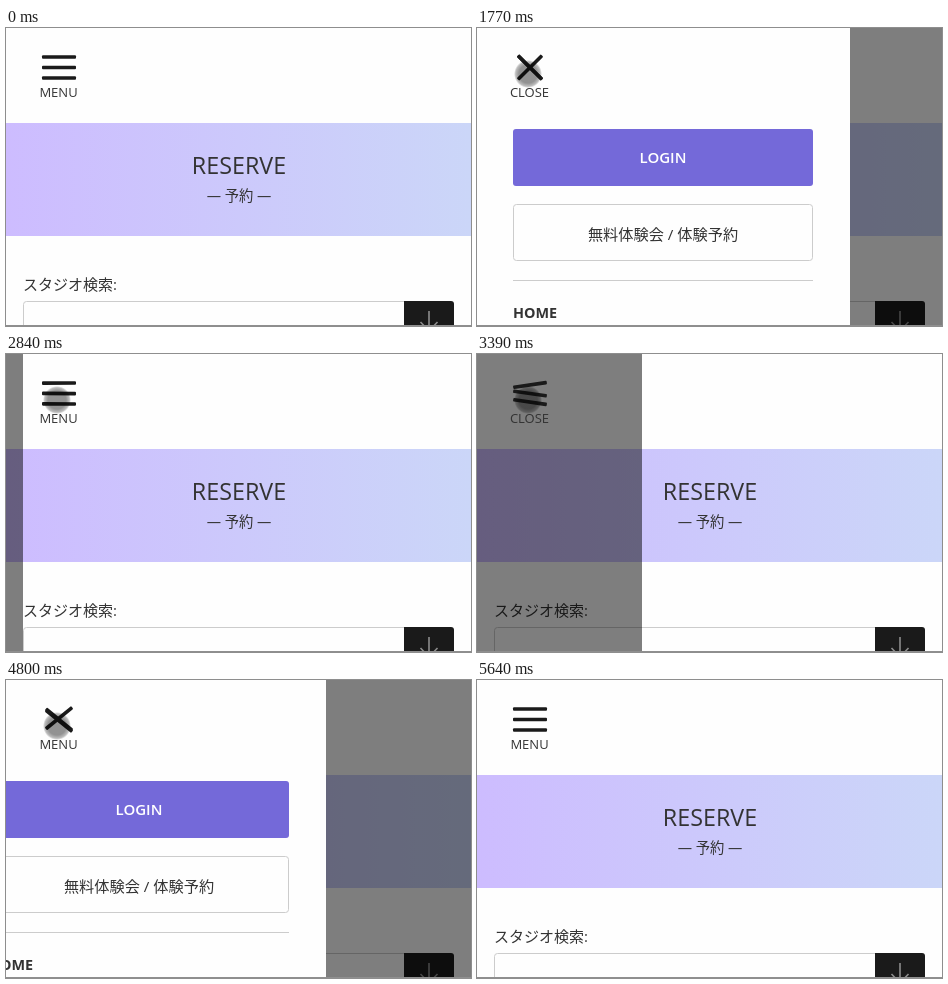
Animation, 465 px wide and 298 px high, one loop 6.04 s. Source, as an HTML page:

```html
<!DOCTYPE html>
<html lang="ja">
<head>
<meta charset="utf-8">
<title>Drawer menu</title>
<style>
  html, body { margin: 0; width: 100%; height: 100%; overflow: hidden; background: #fefefe; }
  svg { display: block; width: 100%; height: 100%; }
  text { font-family: "Open Sans", "Noto Sans CJK JP", "Noto Sans CJK", sans-serif; fill: #333; }
  .mid { text-anchor: middle; }
  .rule { stroke: #ccc; fill: #fefefe; }
  .bars rect { fill: #1a1a1a; }
</style>
</head>
<body>
<svg viewBox="0 0 465 298">
  <defs>
    <linearGradient id="sky">
      <stop stop-color="#cdbcff"/>
      <stop offset="1" stop-color="#cbd6f8"/>
    </linearGradient>
    <radialGradient id="soft">
      <stop offset=".65" stop-opacity=".5"/>
      <stop offset=".88" stop-opacity=".3"/>
      <stop offset="1" stop-opacity="0"/>
    </radialGradient>
  </defs>

  <rect width="465" height="298" fill="#fefefe"/>
  <rect y="95" width="465" height="113" fill="url(#sky)"/>
  <text class="mid" x="233" y="146" font-size="23.3">RESERVE</text>
  <text class="mid" x="233" y="173" font-size="14.3">— 予約 —</text>
  <text x="17" y="262" font-size="15">スタジオ検索:</text>
  <rect class="rule" x="17.5" y="273.5" width="400" height="50" rx="3"/>
  <path d="M398 273h47a3 3 0 0 1 3 3v30h-50z" fill="#1a1a1a"/>
  <path d="M423 283v22M414.5 294l8.5 9 8.5-9" fill="none" stroke="#8c8c8c" stroke-width="1.6"/>

  <!-- drawer and its wider shade slide as one -->
  <g id="drawer">
    <rect width="560" height="298" fill-opacity=".5"/>
    <rect width="373" height="298" fill="#fefefe"/>
    <rect x="36" y="101" width="300" height="57" rx="3" fill="#7469d9"/>
    <text class="mid" x="186" y="135" font-size="15" font-weight="600" style="fill:#fff">LOGIN</text>
    <rect class="rule" x="36.5" y="176.5" width="299" height="56" rx="3"/>
    <text class="mid" x="186" y="212" font-size="15.2">無料体験会 / 体験予約</text>
    <path class="rule" d="M36 252.5h300"/>
    <text x="36" y="290" font-size="14.4" font-weight="700">HOME</text>
  </g>

  <g class="bars">
    <rect id="top" x="-17" y="-1.8" width="34" height="3.6" rx="1"/>
    <rect id="middle" x="-17" y="-1.8" width="34" height="3.6" rx="1"/>
    <rect id="bottom" x="-17" y="-1.8" width="34" height="3.6" rx="1"/>
  </g>
  <text id="label" class="mid" x="52.5" y="69" font-size="13">MENU</text>
  <circle id="touch" r="14" fill="url(#soft)"/>
  <path d="M0 297.5h465" stroke="#8f8f8f"/>
</svg>
<script>
  const LOOP = 6040, SLIDE = 500, SHADE = 560;
  const el = id => document.getElementById(id);

  // The screen refreshes only at these moments (ms).
  const ticks = [
    0, 1370, 1450, 1530, 1600, 1680, 1760, 1830,
    2380, 2460, 2550, 2610, 2690, 2770, 2840, 2920,
    3240, 3310, 3390, 3480, 3550, 3620, 3700, 3770, 3850,
    4630, 4800, 4880, 4950, 5030, 5100, 5180, 5260, 5330, 5410, 5490, 5560, 5640
  ];
  const toggles = [[1280, 1], [2450, 0], [3290, 1], [4750, 0]];
  const presses = [[2380, 2450], [3240, 3300], [4630, 4750]];
  const path = [[1370, 51, 46], [5260, 230, 140], [5330, 443, 248],
                [5410, 445, 251], [5490, 435, 264], [5560, 421, 284], [5640, -50, -50]];

  const last = (list, t) => list.filter(e => e[0] <= t).pop();

  // cubic-bezier(.25, .1, .25, 1)
  function ease(x) {
    if (x >= 1) return 1;
    const curve = (a, b, u) => 3 * a * u * (1 - u) ** 2 + 3 * b * u * u * (1 - u) + u ** 3;
    let lo = 0, hi = 1;
    for (let i = 0; i < 24; i++) {
      const u = (lo + hi) / 2;
      if (curve(.25, .25, u) < x) lo = u; else hi = u;
    }
    return curve(.1, 1, lo);
  }

  function bar(id, y, angle) {
    el(id).setAttribute("transform", `translate(53 ${y}) rotate(${angle})`);
  }

  function draw(time) {
    const t = ticks.filter(k => k <= time).pop();
    const [start, open] = last(toggles, t) || [-SLIDE, 0];
    const done = ease((t - start) / SLIDE);
    let p = open ? done : 1 - done;
    if (p < .01) p = 0;

    el("drawer").setAttribute("transform", `translate(${Math.round(SHADE * (p - 1))} 0)`);
    el("label").textContent = open ? "CLOSE" : "MENU";

    const q = p ** 1.4, turn = 45 * q, shift = 10.5 * q;
    bar("top", 29 + shift, -turn);
    bar("middle", 39.5, turn);
    bar("bottom", 50 - shift, turn);

    const [, x, y] = last(path, t) || [0, -50, -50];
    const pressed = presses.some(([a, b]) => t >= a && t < b);
    el("touch").setAttribute("transform", `translate(${x} ${y})`);
    el("touch").setAttribute("opacity", pressed ? 1 : .85);
  }

  const begin = performance.now();
  function loop() {
    draw((performance.now() - begin) % LOOP);
    requestAnimationFrame(loop);
  }
  loop();
</script>
</body>
</html>
```
